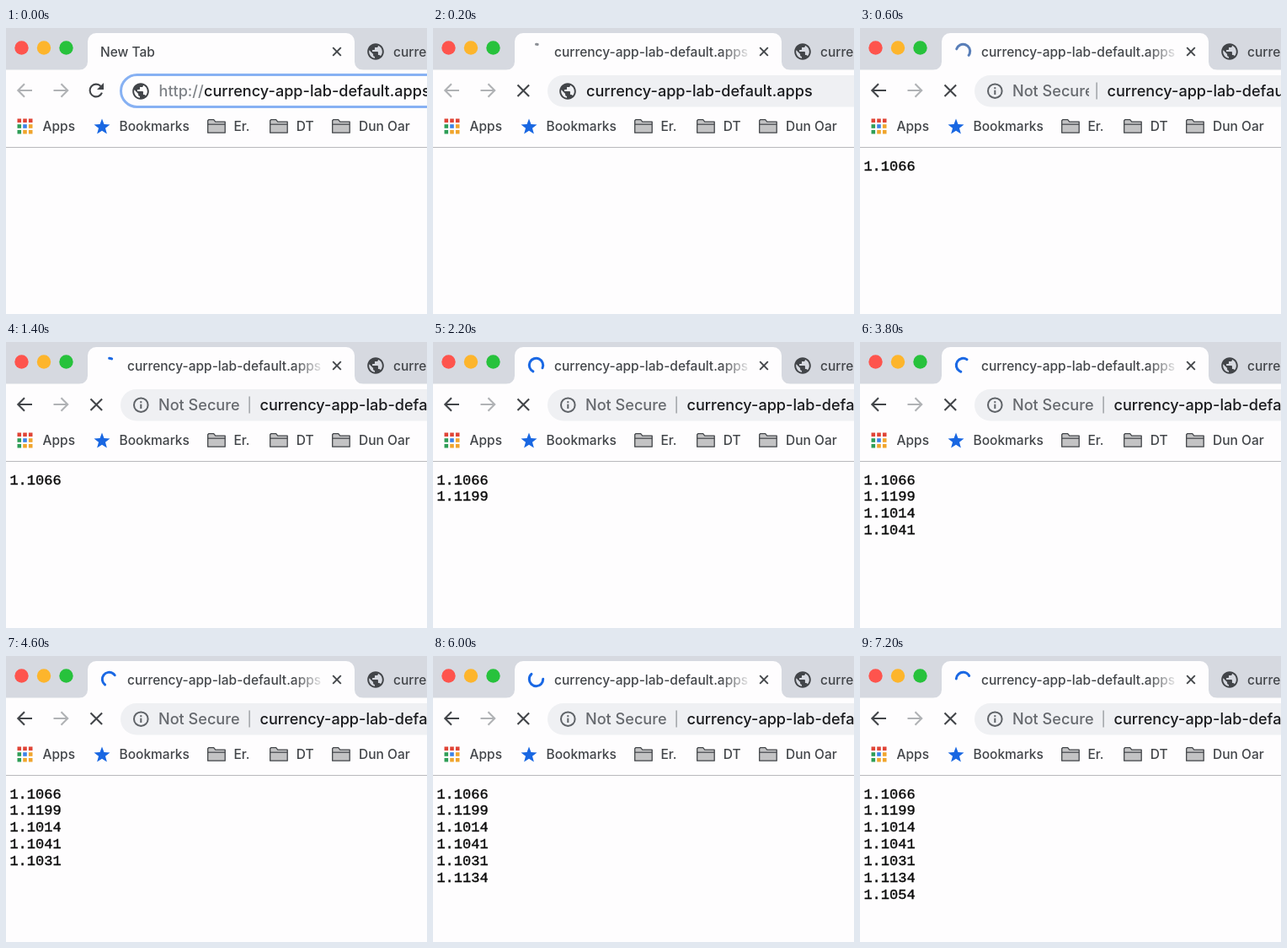
An HTML page with a canvas that plays this animation: 500x339 px, repeating every 7.4 s.

```html
<!DOCTYPE html>
<html lang="en">
<head>
<meta charset="utf-8">
<title>Streaming rates</title>
<style>
html, body { margin: 0; width: 100%; height: 100%; overflow: hidden; background: #fefdfe; }
canvas { display: block; width: 500px; height: 339px; }
</style>
</head>
<body>
<canvas id="stage" width="500" height="339"></canvas>
<script>
const ctx = document.getElementById('stage').getContext('2d');
const LOOP = 7400, STEP = 200;
const PAGE = '#fefdfe', STRIP = '#d6d9e0', INK = '#424549', FAINT = '#b0b2b5';
const UI = '500 SIZE Inter, "Open Sans", sans-serif';
const MONO = 'SIZE "Liberation Mono", "DejaVu Sans Mono", monospace';
const SMALL = 15.5, LARGE = 18.1;
const HOST = 'currency-app-lab-default.apps';
const RATES = ['1.1066', '1.1199', '1.1014', '1.1041', '1.1031', '1.1134', '1.1054'];
const SUBMIT = 200, COMMIT = 450, FIRST_RATE = 600, RATE_GAP = 1000;
const RAD = Math.PI / 180;

const GLOBE = new Path2D('M12 2C6.48 2 2 6.48 2 12s4.48 10 10 10 10-4.48 10-10S17.52 2 12 2zm-1 17.93' +
  'c-3.95-.49-7-3.85-7-7.93 0-.62.08-1.21.21-1.79L9 15v1c0 1.1.9 2 2 2v1.93zm6.9-2.54' +
  'c-.26-.81-1-1.39-1.9-1.39h-1v-3c0-.55-.45-1-1-1H8v-2h2c.55 0 1-.45 1-1V7h2' +
  'c1.1 0 2-.9 2-2v-.41c2.93 1.19 5 4.06 5 7.41 0 2.08-.8 3.97-2.1 5.39z');

function text(str, x, y, size, color, font = UI) {
  ctx.font = font.replace('SIZE', size + 'px');
  ctx.fillStyle = color;
  ctx.fillText(str, x, y);
}

function disc(x, y, r, color) {
  ctx.fillStyle = color;
  ctx.beginPath();
  ctx.arc(x, y, r, 0, 2 * Math.PI);
  ctx.fill();
}

function stroke(color, width, ...lines) {
  ctx.strokeStyle = color;
  ctx.lineWidth = width;
  ctx.beginPath();
  for (const [start, ...rest] of lines) {
    ctx.moveTo(...start);
    for (const p of rest) ctx.lineTo(...p);
  }
  ctx.stroke();
}

function cross(x, y, r, width) {
  stroke(INK, width, [[x - r, y - r], [x + r, y + r]], [[x + r, y - r], [x - r, y + r]]);
}

function arrow(x, y, dir, color) {
  stroke(color, 2.1, [[x - dir * 8.5, y], [x + dir * 7.5, y]],
    [[x + dir * 0.5, y - 7.7], [x + dir * 8.2, y], [x + dir * 0.5, y + 7.7]]);
}

function globe(x, y) {
  ctx.save();
  ctx.translate(x, y);
  ctx.scale(0.98, 0.98);
  ctx.translate(-12, -12);
  ctx.fillStyle = INK;
  ctx.fill(GLOBE);
  ctx.restore();
}

function reload(x, y) {
  ctx.strokeStyle = INK;
  ctx.lineWidth = 2.1;
  ctx.beginPath();
  ctx.arc(x, y, 7.4, 20 * RAD, 318 * RAD);
  ctx.stroke();
  ctx.fillStyle = INK;
  ctx.beginPath();
  ctx.moveTo(x + 9, y - 9);
  ctx.lineTo(x + 9, y - 1);
  ctx.lineTo(x + 1, y - 1);
  ctx.fill();
}

function star(x, y, r) {
  ctx.fillStyle = '#1967e2';
  ctx.beginPath();
  for (let i = 0; i < 10; i++) {
    const a = (i * 36 - 90) * RAD, d = i % 2 ? r * 0.42 : r;
    ctx.lineTo(x + d * Math.cos(a), y + d * Math.sin(a));
  }
  ctx.fill();
}

function folder(x, y) {
  ctx.fillStyle = '#c3c3c4';
  ctx.strokeStyle = INK;
  ctx.lineWidth = 1.3;
  ctx.lineJoin = 'round';
  ctx.beginPath();
  ctx.moveTo(x, y + 15.5);
  for (const [dx, dy] of [[0, 1], [1, 0], [7, 0], [9, 2.5], [20.5, 2.5], [20.5, 15.5]]) ctx.lineTo(x + dx, y + dy);
  ctx.closePath();
  ctx.fill();
  ctx.stroke();
  stroke(INK, 1.2, [[x, y + 5.5], [x + 20.5, y + 5.5]]);
  ctx.lineJoin = 'miter';
}

// Cubic bezier easing from (0,0) to (1,1), solved by bisection.
function ease(x, x1, y1, x2, y2) {
  const at = (p, a, b) => 3 * (1 - p) ** 2 * p * a + 3 * (1 - p) * p * p * b + p ** 3;
  let lo = 0, hi = 1;
  for (let i = 0; i < 24; i++) {
    const mid = (lo + hi) / 2;
    if (at(mid, x1, x2) < x) lo = mid; else hi = mid;
  }
  return at(lo, y1, y2);
}

function throbberArc(start, sweep, color) {
  ctx.strokeStyle = color;
  ctx.lineWidth = 3;
  ctx.lineCap = 'round';
  ctx.beginPath();
  ctx.arc(122.5, 27.5, 8.2, start * RAD, (start + sweep) * RAD, sweep < 0);
  ctx.stroke();
  ctx.lineCap = 'butt';
}

function throbber(t) {
  if (t < COMMIT) {
    throbberArc(270 - 360 * (t - SUBMIT) / 1320, 12 + (t - SUBMIT) / 5, '#8b8f95');
    return;
  }
  const elapsed = t + 3045, half = 2000 / 3;
  const turn = Math.floor(elapsed / (2 * half));
  const growing = Math.floor(elapsed / half) % 2;
  let start = 262 + 360 * elapsed / 1568 + 270 * turn;
  let sweep = 270 * ease((elapsed % half) / half, 0.4, 0, 0.2, 1) - (growing ? 0 : 270);
  if (Math.abs(sweep) < 5) {
    const least = growing ? 5 : -5;
    start += sweep - least;
    sweep = least;
  }
  const mix = ease(Math.min((t - COMMIT) / 900, 1), 0, 0, 0.2, 1);
  const rgb = [[139, 26], [143, 104], [149, 228]].map(([a, b]) => Math.round(a + (b - a) * mix));
  throbberArc(start, sweep, `rgb(${rgb})`);
}

function tabStrip(t) {
  ctx.fillStyle = STRIP;
  ctx.fillRect(0, 0, 500, 49.5);
  ['#fe544d', '#fdb52c', '#27c23c'].forEach((c, i) => disc(18.5 + 26.5 * i, 23.5, 8.2, c));

  ctx.fillStyle = PAGE;
  ctx.beginPath();
  ctx.moveTo(87, 50);
  ctx.arcTo(97, 50, 97, 40, 10);
  ctx.arcTo(97, 6, 107, 6, 10);
  ctx.arcTo(414, 6, 414, 16, 10);
  ctx.arcTo(414, 50, 424, 50, 10);
  ctx.lineTo(424, 50);
  ctx.fill();

  if (t < SUBMIT) {
    text('New Tab', 112, 33.5, SMALL, INK);
  } else {
    const fade = ctx.createLinearGradient(342, 0, 379, 0);
    fade.addColorStop(0, INK);
    fade.addColorStop(1, 'rgba(66,69,73,0)');
    text(HOST, 144, 33.5, SMALL, fade);
    throbber(t);
  }
  cross(393, 28, 4.8, 1.9);
  globe(439, 28);
  text('currency', 460, 33.5, SMALL, INK);
}

function addressBar(t) {
  arrow(22.5, 74, -1, t < COMMIT ? FAINT : INK);
  arrow(65, 74, 1, FAINT);
  if (t < SUBMIT) reload(107, 74); else cross(107.3, 74.3, 6.8, 2.1);

  ctx.beginPath();
  if (t < SUBMIT) {
    ctx.roundRect(136.5, 55.5, 420, 38, 19);
    ctx.strokeStyle = '#87b1f3';
    ctx.lineWidth = 3;
    ctx.stroke();
    globe(160, 75);
    text('http://', 181.5, 80.5, LARGE, '#7f8388');
    text(HOST, 235, 80.5, LARGE, '#1a1b1e');
    return;
  }
  ctx.roundRect(136, 56, 420, 37.5, 18.75);
  ctx.fillStyle = '#eff0f3';
  ctx.fill();
  if (t < COMMIT) {
    globe(160, 75);
    text(HOST, 182, 80.5, LARGE, '#1a1b1e');
    return;
  }
  ctx.strokeStyle = '#5f6368';
  ctx.lineWidth = 2;
  ctx.beginPath();
  ctx.arc(160.3, 74.7, 8.3, 0, 2 * Math.PI);
  ctx.stroke();
  ctx.fillStyle = '#5f6368';
  ctx.fillRect(159.3, 73.7, 2, 5.3);
  ctx.fillRect(159.3, 70.2, 2, 2);

  const shift = t < COMMIT + STEP ? -8 : 0;
  ctx.save();
  ctx.beginPath();
  ctx.rect(180, 56, 100 + shift, 38);
  ctx.clip();
  text('Not Secure', 181, 80.5, LARGE, '#66696e');
  ctx.restore();
  ctx.fillStyle = '#8c8f93';
  ctx.fillRect(288.5 + shift, 64.5, 1.2, 20);
  text(HOST, 301.5 + shift, 80.5, LARGE, '#1a1b1e');
}

function bookmarkBar() {
  const [r, g, b, y] = ['#e04436', '#2f9e57', '#3b82e8', '#f0a52d'];
  [r, r, r, g, b, y, g, y, y].forEach((color, i) => {
    ctx.fillStyle = color;
    ctx.fillRect(13.5 + 6.7 * (i % 3), 107.5 + 6.7 * Math.floor(i / 3), 4.6, 4.6);
  });
  star(114, 117.5, 10);
  text('Apps', 43.5, 122, SMALL, INK);
  text('Bookmarks', 134.5, 122, SMALL, INK);
  ['Er.', 'DT', 'Dun Oar'].forEach((label, i) => {
    folder(239.7 + 74 * i, 108.7);
    text(label, 270.5 + 74.3 * i, 122, SMALL, INK);
  });
  ctx.fillStyle = '#b9b9bc';
  ctx.fillRect(0, 141, 500, 1);
}

function rateLine(rate, i) {
  const x = 4.4, y = 168.5 + 19.9 * i;
  text(rate, x, y, 17, '#0c0c0c', MONO);
  ctx.strokeStyle = '#0c0c0c';
  ctx.lineWidth = 0.4;
  ctx.strokeText(rate, x, y);
}

function draw(t) {
  ctx.fillStyle = PAGE;
  ctx.fillRect(0, 0, 500, 339);
  tabStrip(t);
  addressBar(t);
  bookmarkBar();
  const shown = Math.max(0, Math.floor((t - FIRST_RATE) / RATE_GAP) + 1);
  RATES.slice(0, shown).forEach(rateLine);
}

const origin = performance.now();
function tick() {
  const t = (performance.now() - origin) % LOOP;
  draw(Math.floor(t / STEP) * STEP);
  requestAnimationFrame(tick);
}
tick();
</script>
</body>
</html>
```
